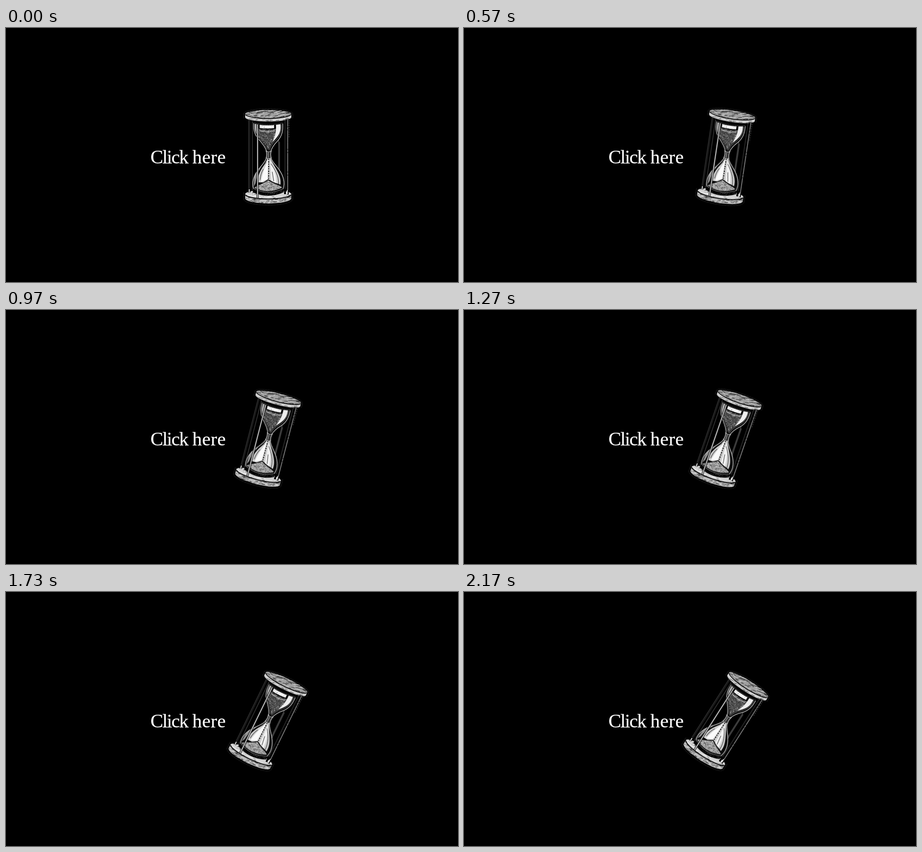
An HTML page for the animation above (2200 ms loop, 998 px wide and 561 px high).

```html
<!DOCTYPE html>
<html lang="en">
<head>
<meta charset="utf-8">
<title>Hourglass</title>
<style>
html, body { margin: 0; width: 100%; height: 100%; overflow: hidden; background: #000; }
svg { display: block; width: 998px; height: 561px; }
text { font: 42px "Liberation Serif", "Times New Roman", serif; fill: #fff; stroke: #fff; stroke-width: .25px; }
.click { letter-spacing: -1.7px; }
.here { letter-spacing: .4px; }
#glass {
  transform-origin: 577.7px 282px;
  animation: tilt 2200ms steps(66) -4ms infinite;
}
@keyframes tilt { from { transform: rotate(0deg); } to { transform: rotate(33deg); } }
.line { fill: none; stroke-linecap: round; stroke-linejoin: round; }
</style>
</head>
<body>
<svg viewBox="0 0 998 561">
  <defs>
    <path id="upper" d="M546 208C545 226 548 237 559 248C568 258 573 264 576 275H584C587 264 592 258 600 249C611 238 613 226 612 208Z"/>
    <path id="lower" d="M576 284C573 295 565 303 557 313C546 327 542 344 547 355Q579 369 612 355C616 342 613 327 603 313C596 303 587 295 584 284Z"/>
    <path id="sand" d="M557 222Q579 227 599 222C602 236 597 245 591 251C585 258 582 263 580 271C577 263 572 256 566 250C560 244 557 236 557 222Z"/>
    <path id="mound" d="M548 353C556 347 570 343 579 336C588 343 602 346 610 352Q579 368 548 353Z"/>
    <ellipse id="lid" cx="579" cy="190" rx="51" ry="9"/>
    <path id="lidRim" d="M528 190A51 10 0 0 0 630 190V197A51 9.5 0 0 1 528 197Z"/>
    <ellipse id="foot" cx="579" cy="367" rx="51" ry="10"/>
    <path id="footRim" d="M528 366A51 11 0 0 0 630 366V376A51 11.5 0 0 1 528 376Z"/>
    <path id="collar" d="M545 352V363Q579 378 613 363V352Q579 368 545 352Z"/>
  </defs>

  <text y="299"><tspan class="click" x="319">Click</tspan><tspan class="here" x="411.6">here</tspan></text>

  <g id="glass">
    <!-- faint rims around the plates -->
    <g class="line" stroke="#303030" stroke-width=".8" stroke-dasharray="5 1.5">
      <path d="M525 199V189C528 175 630 175 633 189V199"/>
      <path d="M525 363V379C532 395 626 395 633 379V363"/>
    </g>

    <!-- rods behind the bulbs -->
    <g class="line">
      <path d="M536 203V359M544 206V358" stroke="#666" stroke-width=".9"/>
      <path d="M538.5 203V359" stroke="#303030" stroke-width="1"/>
      <path d="M602 248V312M604 252V316" stroke="#858585" stroke-width=".9"/>
      <path d="M616 204V359" stroke="#555" stroke-width=".9"/>
      <path d="M622 203V362" stroke="#b4b4b4" stroke-width="1.3" stroke-dasharray="14 2 5 2 26 1"/>
      <path d="M625 204V242" stroke="#666" stroke-width="1" stroke-dasharray="2 3"/>
    </g>

    <!-- foot -->
    <use href="#foot" fill="#d2d2d2"/>
    <g data-clip="foot" id="footMarks"></g>
    <use href="#footRim" fill="#bdbdbd"/>
    <g data-clip="footRim" id="footRimMarks"></g>
    <path class="line" d="M529 369A51 11 0 0 0 629 369" stroke="#000" stroke-width="2"/>
    <path class="line" d="M530 366A51 11 0 0 0 628 366" stroke="#e8e8e8" stroke-width="1.2"/>
    <use href="#collar" fill="#050505"/>
    <g data-clip="collar" id="collarMarks"></g>
    <path d="M537 355V364M616 355V367M622 358V368" stroke="#000" stroke-width="4"/>
    <path d="M537 356V364M621 358V367" stroke="#e8e8e8" stroke-width="2"/>

    <!-- upper bulb -->
    <use href="#upper" fill="#050505"/>
    <g data-clip="upper" id="upperMarks">
      <path d="M560 214Q579 216 592 214V221Q579 223 560 221Z" fill="#f4f4f4"/>
      <path d="M549 212C548 228 552 236 561 244L556 232Q553 222 553 212Z" fill="#b0b0b0"/>
    </g>
    <use href="#sand" fill="#4a4a4a"/>
    <g data-clip="sand" id="sandMarks"></g>
    <path d="M596 213L606 212C608 229 603 238 588 252C595 238 597 228 596 213Z" fill="#eee"/>
    <path class="line" d="M561 227Q579 231 592 227" stroke="#c4c4c4" stroke-width="1.6"/>
    <path class="line" d="M547 210C546 226 549 237 560 248C568 258 573 264 576 274M611 210C612 226 610 238 600 249C592 257 587 264 584 274" stroke="#ccc" stroke-width="1.4"/>
    <path class="line" d="M608 213C609 230 603 240 595 249C588 256 584 262 582 270M554 237C563 248 571 256 577 268" stroke="#999" stroke-width=".8"/>

    <!-- lower bulb -->
    <use href="#lower" fill="#0b0b0b"/>
    <g data-clip="lower">
      <path d="M578 286C574 300 558 313 554 341L568 341 579 334 590 340 606 346C609 326 594 310 583 286Z" fill="#cfcfcf"/>
      <path d="M579 289C573 306 567 317 563 340L577 334Z" fill="#fafafa"/>
      <path d="M583 292C591 310 597 324 597 343L586 338Z" fill="#f2f2f2"/>
      <path d="M548 327Q554 315 563 307Q553 324 551 343L547 350Z" fill="#909090"/>
      <g class="line" stroke="#161616" stroke-width="1">
        <path d="M574 297C562 312 556 322 555 340M568 312Q562 322 561 335"/>
        <path d="M585 300C594 313 602 325 602 345M588 318L591 338"/>
      </g>
      <path d="M580 289V338" stroke="#161616" stroke-width="2.2" stroke-dasharray="2.5 2.4 3.5 2"/>
    </g>
    <use href="#mound" fill="#a4a4a4"/>
    <g data-clip="mound" id="moundMarks"></g>
    <path class="line" d="M548 353C556 347 570 343 579 336C588 343 602 346 610 352" stroke="#333" stroke-width=".8" stroke-dasharray="4 3"/>
    <path class="line" d="M576 285C573 295 565 303 557 313C546 327 542 344 547 355M584 285C587 295 596 303 603 313C613 327 616 342 612 355" stroke="#c8c8c8" stroke-width="1.4"/>
    <path class="line" d="M547 355Q579 371 612 355" stroke="#888" stroke-width="1"/>

    <!-- neck -->
    <path d="M575 272Q580 275 585 272Q583 279 585 287Q580 290 575 287Q577 279 575 272Z" fill="#333"/>
    <path class="line" d="M574 271C576 276 576 282 574 288M586 271C584 276 584 282 586 288" stroke="#d0d0d0" stroke-width="1.3"/>
    <path class="line" d="M575 272Q580 275 585 272M575 287Q580 290 585 287M579 275V286" stroke="#bbb" stroke-width="1.1"/>

    <!-- front rod -->
    <path d="M555.5 206V375" stroke="#000" stroke-width="4.4"/>
    <path d="M555.5 207V375" stroke="#e9e9e9" stroke-width="1.9"/>

    <!-- lid -->
    <path d="M547 203V211Q579 219 612 211V203Z" fill="#050505"/>
    <path class="line" d="M549 210Q579 217 610 210" stroke="#666" stroke-width="1" stroke-dasharray="2 2"/>
    <use href="#lidRim" fill="#cfcfcf"/>
    <g data-clip="lidRim" id="lidRimMarks"></g>
    <use href="#lid" fill="#a0a0a0"/>
    <g data-clip="lid" id="lidMarks"></g>
    <path class="line" d="M529 192A51 10 0 0 0 629 192" stroke="#000" stroke-width="1.5"/>
    <path class="line" d="M529 194A51 10 0 0 0 629 194" stroke="#eee" stroke-width="1"/>
  </g>
</svg>
<script>
const NS = "http://www.w3.org/2000/svg";
const defs = document.querySelector("defs");
let seed = 41;
const rand = (a, b) => {
  seed = (seed * 16807) % 2147483647;
  return a + (b - a) * seed / 2147483647;
};

function add(parent, tag, attrs) {
  const el = parent.appendChild(document.createElementNS(NS, tag));
  for (const key in attrs) el.setAttribute(key, attrs[key]);
  return el;
}

for (const el of document.querySelectorAll("[data-clip]")) {
  const name = el.dataset.clip;
  add(add(defs, "clipPath", { id: name + "Clip" }), "use", { href: "#" + name });
  el.setAttribute("clip-path", `url(#${name}Clip)`);
}

// Scatters short strokes over a box; a length near zero gives dots.
function scatter(id, count, [x0, y0, x1, y1], length, slope, color, width) {
  let d = "";
  for (let i = 0; i < count; i++) {
    const len = length * rand(.4, 1);
    const x = rand(x0, x1), y = rand(y0, y1);
    d += `M${x.toFixed(1)} ${y.toFixed(1)}l${len.toFixed(2)} ${(len * slope).toFixed(2)}`;
  }
  add(document.getElementById(id), "path", { d, class: "line", stroke: color, "stroke-width": width });
}

const lid = [522, 180, 630, 200];
scatter("lidMarks", 50, lid, 16, -.16, "#151515", .9);
scatter("lidMarks", 30, lid, 14, -.2, "#e4e4e4", .8);
scatter("lidMarks", 16, lid, 7, .25, "#222", .8);
scatter("lidRimMarks", 32, [525, 194, 631, 208], 9, -.12, "#333", .8);

const foot = [525, 358, 631, 378];
scatter("footMarks", 18, foot, 10, -.2, "#222", .8);
scatter("footMarks", 20, foot, 9, -.1, "#fff", 1);
const rim = [523, 370, 631, 389];
scatter("footRimMarks", 60, rim, 9, -.18, "#262626", .9);
scatter("footRimMarks", 30, rim, 8, .3, "#eee", .8);
scatter("collarMarks", 50, [546, 357, 612, 373], 2.5, -.6, "#666", .7);

scatter("upperMarks", 60, [547, 207, 611, 245], .1, 0, "#777", 1);
const sand = [556, 222, 603, 270];
scatter("sandMarks", 280, sand, .1, 0, "#c8c8c8", 1.1);
scatter("sandMarks", 120, sand, .1, 0, "#080808", 1.3);
const mound = [547, 337, 611, 361];
scatter("moundMarks", 190, mound, .1, 0, "#222", 1.2);
scatter("moundMarks", 110, mound, .1, 0, "#fff", 1.1);
</script>
</body>
</html>
```
